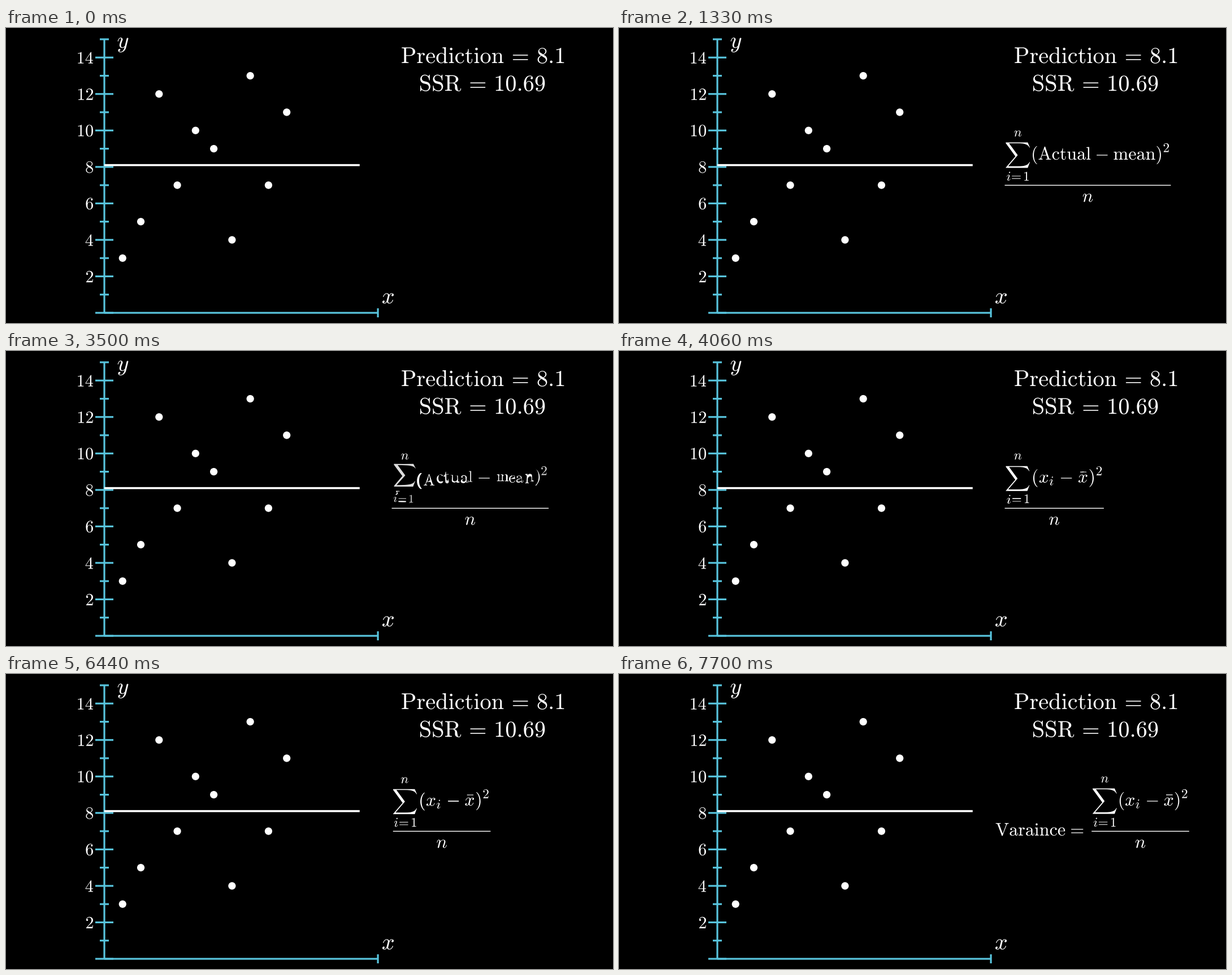
Recreate the animation shown at these times as a matplotlib script. Size 1074 by 522 pixels, loop 8 s.

```python
import numpy as np
import matplotlib.pyplot as plt
from matplotlib.animation import FuncAnimation
from matplotlib.collections import PathCollection
from matplotlib.patches import Circle
from matplotlib.path import Path
from matplotlib.text import Text
from matplotlib.textpath import text_to_path

plt.rcParams.update({"mathtext.fontset": "cm", "path.snap": False, "toolbar": "None"})

W, H = 1074, 522
LOOP, STEP, TICK = 8000, 40, 70        # ms
WRITE, TO_SYMBOLS, TO_VARIANCE, RUN = 60, 3166, 6317, 1050
BLUE = "#58C4DD"
PX = 0.72                              # points per pixel
X0, Y0, UNIT = 174, 504, 32.27         # plot origin and scale
EM, SCRIPT, BASE = 32.15, 23.5, 233    # formula sizes and baseline
PROP = Text().get_fontproperties()
ARITY = {1: 1, 2: 1, 3: 2, 4: 3, 79: 1}


# ---- outlines as lists of contours, each an array of cubic curves ----

def line(p, q):
    return [p, p + (q - p) / 3, p + 2 * (q - p) / 3, q]


def cubics(verts, codes):
    verts, contours, i = np.asarray(verts, float), [], 0
    while i < len(codes):
        code = int(codes[i])
        v = verts[i:i + ARITY[code]]
        i += ARITY[code]
        if code == Path.MOVETO:
            contours.append([])
            p = start = v[0]
            continue
        if code == Path.CLOSEPOLY:
            if not np.allclose(p, start):
                contours[-1].append(line(p, start))
            p = start
            continue
        end = v[-1]
        if code == Path.LINETO:
            curve = line(p, end)
        elif code == Path.CURVE3:
            curve = [p, p + 2 / 3 * (v[0] - p), end + 2 / 3 * (v[0] - end), end]
        else:
            curve = [p, *v]
        contours[-1].append(curve)
        p = end
    # PostScript order: counterclockwise, upper parts first
    return [np.array(c)[::-1, ::-1] for c in contours[::-1] if c]


def to_path(contours):
    verts, codes = [], []
    for c in contours:
        verts += [c[0, :1], c[:, 1:].reshape(-1, 2)]
        codes += [Path.MOVETO] + [Path.CURVE4] * (3 * len(c))
    return Path(np.concatenate(verts), codes)


def tex(s, size, x, y, ha=0, va=None, height=None):
    """Glyphs of a formula; ha and va place the ink, va=None sets the baseline."""
    info, shapes, _ = text_to_path.get_glyphs_mathtext(PROP, f"${s}$")
    glyphs = [[(c * k + (gx, gy)) * (0.01, -0.01) for c in cubics(*shapes[key])]
              for key, gx, gy, k in info]
    pts = np.concatenate([c.reshape(-1, 2) for g in glyphs for c in g])
    lo, hi = pts.min(0), pts.max(0)
    if height:
        size = height / (hi - lo)[1]
    ink = lo + (hi - lo) * (ha, va or 0)
    if va is None:
        ink[1] = 0
    return [[(c - ink) * size + (x, y) for c in g] for g in glyphs]


def rect(x, y, w, h):
    r, b = x + w, y + h
    return [cubics([(r, y), (r, b), (x, b), (x, y), (r, y)], [1, 2, 2, 2, 79])]


# ---- morphing ----

def smooth(u):
    sig = lambda z: 1 / (1 + np.exp(-z))
    e = sig(-5)
    return np.clip((sig(10 * (np.clip(u, 0, 1) - 0.5)) - e) / (1 - 2 * e), 0, 1)


def blossom(p, *ts):
    for t in ts:
        p = p[:-1] * (1 - t) + p[1:] * t
    return p[0]


def piece(p, a, b):
    return [blossom(p, *ts) for ts in ((a, a, a), (a, a, b), (a, b, b), (b, b, b))]


def subdivide(curves, n):
    counts = np.bincount(np.arange(n) * len(curves) // n)
    return np.array([piece(c, j / m, (j + 1) / m)
                     for c, m in zip(curves, counts) for j in range(m)])


def extend(glyphs, n):
    """Repeat glyphs evenly up to n; the extra copies are transparent."""
    out, last = [], -1
    for k in np.arange(n) * len(glyphs) // n:
        shape, alpha = glyphs[k]
        out.append((shape, 0 if k == last else alpha))
        last = k
    return out


def pad(shape, n):
    point = np.tile(shape[-1][-1, -1], (1, 4, 1))
    return shape + [point] * (n - len(shape))


def match(a, b):
    n = max(len(a), len(b))
    pairs = list(zip(pad(a, n), pad(b, n)))
    sizes = [max(len(p), len(q)) for p, q in pairs]
    return ([subdivide(p, m) for (p, _), m in zip(pairs, sizes)],
            [subdivide(q, m) for (_, q), m in zip(pairs, sizes)])


def align(src, dst):
    n = max(len(src), len(dst))
    first, second = [], []
    for (a, alpha), (b, beta) in zip(extend(src, n), extend(dst, n)):
        a, b = match(a, b)
        first.append((a, alpha))
        second.append((b, beta))
    return first, second


def morph(src, dst, u):
    return [([p + (q - p) * u for p, q in zip(a, b)], alpha + (beta - alpha) * u)
            for (a, alpha), (b, beta) in zip(src, dst)]


def partial(shape, u):
    """The first share u of a glyph's curves."""
    left, out = u * sum(map(len, shape)), []
    for c in shape:
        k = min(int(left), len(c))
        part = list(c[:k])
        if k < len(c) and left > k:
            part.append(piece(c[k], 0, left - k))
        if part:
            out.append(np.array(part))
        left -= len(c)
        if left <= 0:
            break
    return out


def create(glyphs, u):
    shown = [(partial(g, min(u * len(glyphs) - k, 1)), a)
             for k, (g, a) in enumerate(glyphs) if u * len(glyphs) > k]
    return [(g, a) for g, a in shown if g]


# ---- formulas ----

def fraction(x, body, width):
    """Sum over n; body holds (tex, offset in em, rise, size), width is in em."""
    mid = x + 0.722 * EM
    out = tex("n", SCRIPT, mid, 192, ha=0.5)
    out += tex(r"\sum", EM, mid, 225, ha=0.5, va=0.5, height=45)
    for s, dx in (("i", 3.6), ("=", 12.6), ("1", 34.6)):
        out += tex(s, SCRIPT, x + dx, 270.2)
    for s, dx, rise, size in body:
        if s == "bar":
            out += rect(x + dx * EM, BASE - rise, 11.6, 1.3)
        else:
            out += tex(s, size, x + dx * EM, BASE - rise)
    out += rect(x, 277.6, width * EM, 1.4)
    return out + tex("n", EM, x + width * EM / 2, 307.7, ha=0.5)


words = [("(", 1.543, 0, EM), (r"\mathrm{Actual}", 1.865, 0, EM), ("-", 5.055, 0, EM),
         (r"\mathrm{mean}", 6.0, 0, EM), (")", 8.362, 0, EM), ("2", 8.744, 13.4, SCRIPT)]
symbols = [("(", 1.543, 0, EM), ("x", 1.862, 0, EM), ("i", 2.43, -4.8, SCRIPT),
           ("-", 3.043, 0, EM), ("bar", 4.1, 19.8, 0), ("x", 3.989, 0, EM),
           (")", 4.589, 0, EM), ("2", 4.971, 13.4, SCRIPT)]


def opaque(glyphs):
    return [(g, 1) for g in glyphs]


spelled = opaque(fraction(682.5, words, 9.142))
short = opaque(fraction(682.5, symbols, 5.369))
named = opaque(tex(r"\mathrm{Varaince}", EM, 666.6, 286) + tex("=", EM, 800, 286)
               + fraction(836.2, symbols, 5.369))
spelled_a, short_a = align(spelled, short)
short_b, named_b = align(short_a, named)


# ---- stage ----

fig = plt.figure(figsize=(W / 100, H / 100), dpi=100, facecolor="black")
ax = fig.add_axes([0, 0, 1, 1])
ax.set(xlim=(0, W), ylim=(H, 0))
ax.axis("off")


def px(v):
    return X0 + UNIT * v


def py(v):
    return Y0 - UNIT * v


ax.vlines([px(0), px(15)], [py(15) - 1, Y0 - 8], [Y0, Y0 + 8], color=BLUE, lw=3.2 * PX)
ax.hlines(Y0, px(0), px(15), color=BLUE, lw=3.2 * PX)
for v in range(16):
    half = 8 if v % 2 else 16
    ax.hlines(py(v), X0 - half, X0 + half, color=BLUE, lw=3.2 * PX)
ax.hlines(py(8.1), px(0), px(14), color="white", lw=3.6 * PX, zorder=3)
for k, v in enumerate([3, 5, 12, 7, 10, 9, 4, 13, 7, 11], 1):
    ax.add_patch(Circle((px(k), py(v)), 6.6, color="white", lw=0, zorder=4))

labels = tex("y", 40.4, 197.6, 35.2) + tex("x", 40.4, 666, 487.5)
for v in range(2, 15, 2):
    labels += tex(str(v), 30.3, 154, py(v) + 0.4, ha=1, va=0.5)
for s, x, y in ((r"\mathrm{Prediction}", 700.2, 62.2), ("=", 896.8, 62.2), ("8.1", 940.6, 62.2),
                (r"\mathrm{SSR}", 733, 111.3), ("=", 821.4, 111.3), ("10.69", 866.6, 111.3)):
    labels += tex(s, 40.4, x, y)
ax.add_collection(PathCollection([to_path(g) for g in labels], facecolors="white",
                                 linewidths=0), autolim=False)
formula = PathCollection([], linewidths=0, zorder=5)
ax.add_collection(formula, autolim=False)


def update(i):
    t = (i + 0.5) * STEP
    t -= t % TICK
    if t < TO_SYMBOLS:
        glyphs = create(spelled, smooth((t - WRITE) / RUN))
    elif t < TO_VARIANCE:
        glyphs = morph(spelled_a, short_a, smooth((t - TO_SYMBOLS) / RUN))
    else:
        glyphs = morph(short_b, named_b, smooth((t - TO_VARIANCE) / RUN))
    glyphs = [(g, a) for g, a in glyphs if a > 0]
    formula.set_paths([to_path(g) for g, _ in glyphs])
    formula.set_facecolor([(1, 1, 1, a) for _, a in glyphs])
    return [formula]


anim = FuncAnimation(fig, update, frames=LOOP // STEP, interval=STEP,
                     repeat=True, repeat_delay=0, blit=False)
plt.show()
```
